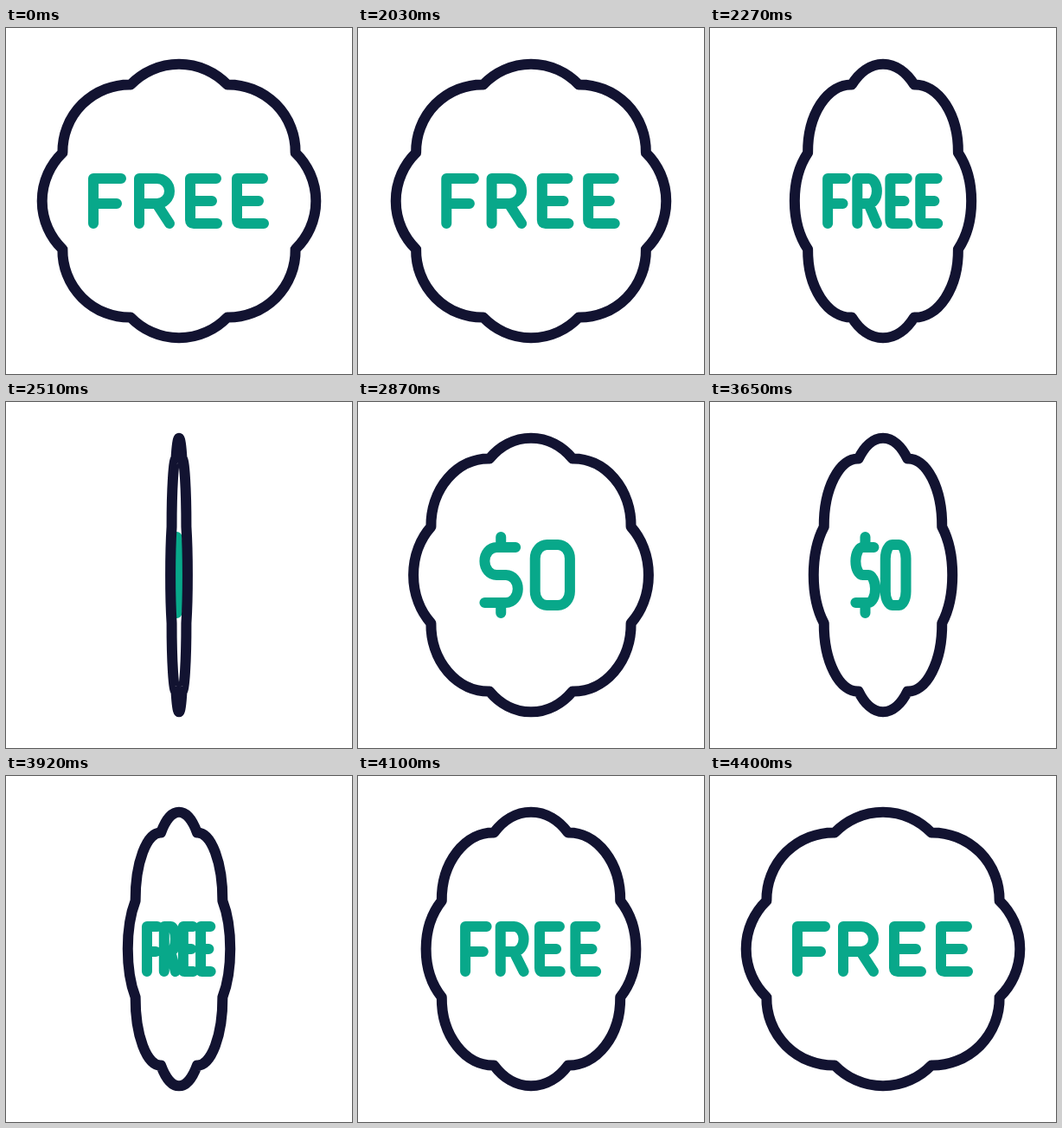
These frames come from a looping animation (400x400 px, 4430 ms). An HTML page with a canvas:

```html
<!DOCTYPE html>
<html lang="en">
<head>
<meta charset="utf-8">
<title>Free badge</title>
<style>
  html, body { margin: 0; width: 100%; height: 100%; overflow: hidden; background: #fff; }
  canvas { display: block; }
</style>
</head>
<body>
<canvas id="stage" width="400" height="400"></canvas>
<script>
const ctx = document.getElementById('stage').getContext('2d');
const NAVY = '#121331', GREEN = '#08a88a';
const LOOP = 4430, HOLD = 2030, STEP = 30;

// All shapes are centred on the origin.
const badge = new Path2D(Array.from({ length: 9 }, (_, i) => {
  const angle = (i * 45 + 22.5) * Math.PI / 180;
  const point = `${145.7 * Math.cos(angle)} ${145.7 * Math.sin(angle)}`;
  return i ? `A77.5 77.5 0 0 1 ${point}` : `M${point}`;
}).join('') + 'Z');

const letterE = x => `M${x + 30}-26H${x}V22Q${x} 26 ${x + 4} 26H${x + 31}M${x} 0H${x + 25}`;
const free = new Path2D(
  'M-99 26V-26H-67M-99 3H-72' +
  'M-46 26V-26H-25.5A14.5 14.5 0 0 1-25.5 3H-46M-26 3L-11 26' +
  letterE(13) + letterE(67));

const zero = new Path2D(
  'M-40.5-44V-32M-40.5 32V44' +
  'M-20.8-32H-46.4A16 16 0 0 0-46.4 0H-33.7A16 16 0 0 1-33.7 32H-62.4');
zero.roundRect(5.5, -35, 46.8, 70, 16);

// Each quarter turn runs between a full-face time and an edge-on time.
const quarters = [
  { until: 16.4, face: -0.5, edge: 16.4, power: 1.8, label: free },
  { until: 39, face: 39, edge: 16.4, power: 2.4, label: zero },
  { until: 60, face: 39, edge: 60, power: 2.6, label: zero },
  { until: 81, face: 80, edge: 60, power: 2.1, label: free },
];

function pose(time) {
  if (time < HOLD) return { width: 1, label: free };
  const step = Math.floor((time - HOLD) / STEP) + 1;
  const { face, edge, power, label } = quarters.find(q => step < q.until);
  return { width: 1 - ((step - face) / (edge - face)) ** power, label };
}

// Squeezes the shape but keeps its line weight.
function strokeSqueezed(shape, width, color) {
  const path = new Path2D();
  path.addPath(shape, { a: width, b: 0, c: 0, d: 1, e: 200, f: 200 });
  ctx.strokeStyle = color;
  ctx.stroke(path);
}

const start = performance.now();
function draw() {
  const { width, label } = pose((performance.now() - start) % LOOP);
  ctx.fillStyle = '#fff';
  ctx.fillRect(0, 0, 400, 400);
  ctx.lineWidth = 12;
  ctx.lineCap = ctx.lineJoin = 'round';
  strokeSqueezed(label, width, GREEN);
  strokeSqueezed(badge, width, NAVY);
  requestAnimationFrame(draw);
}
draw();
</script>
</body>
</html>
```
